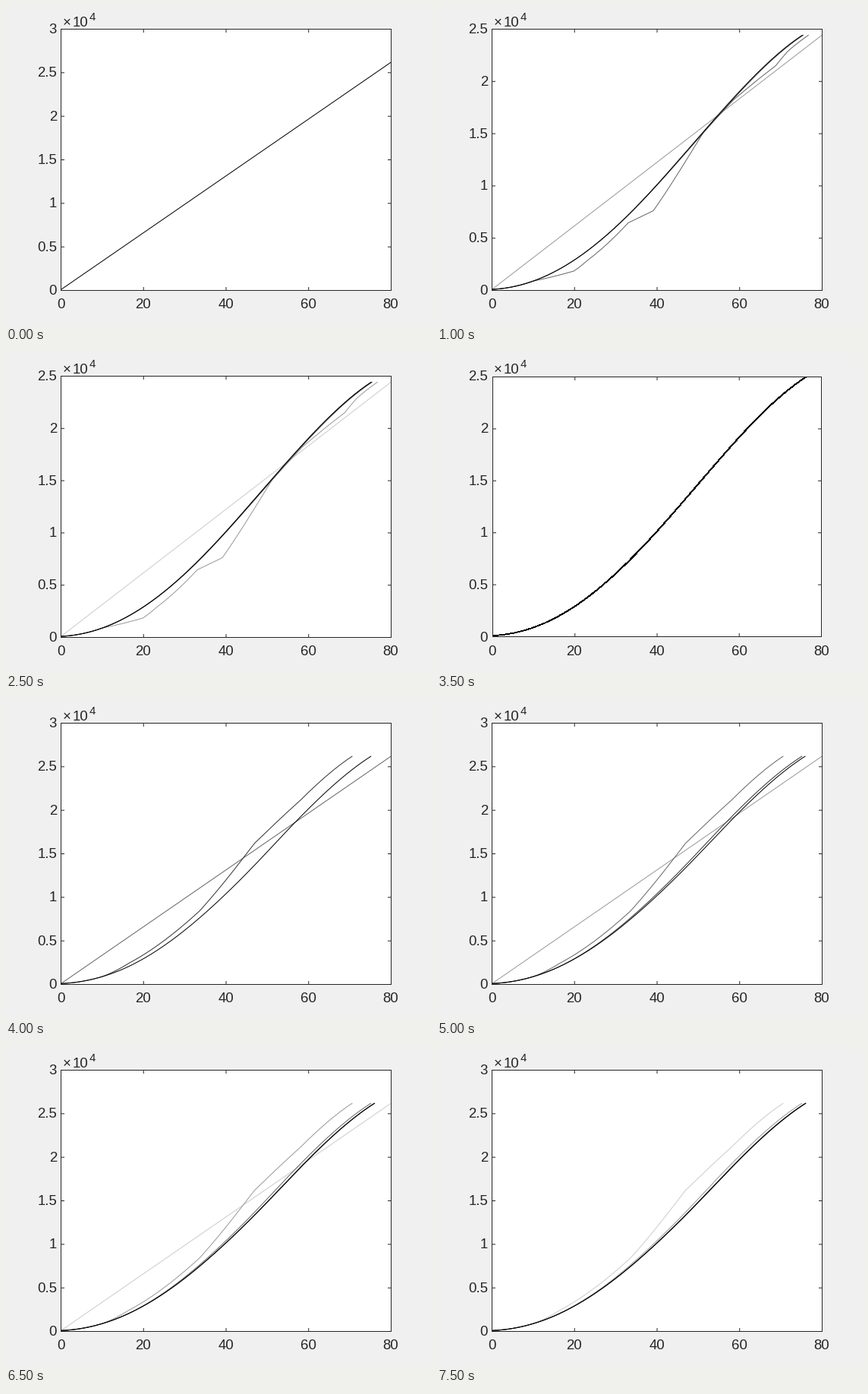
A matplotlib script for the animation above (8000 ms loop, 560 by 420 pixels).

```python
import numpy as np
import matplotlib.pyplot as plt
from matplotlib.animation import FuncAnimation

W, H, DPI = 560, 420, 100
PX = 72 / DPI
INK = "#262626"
FONT = "Liberation Sans"
SIZE = 18.67 * PX

# Order in which the three runs are shown, and the step each one starts at
ORDER = "ACBACBBCABACBACA"
START = {"A": 0, "B": 3, "C": 4}

# Plot box: left, top, right, bottom
WIDE = (72, 30, 507, 374)
TIGHT = (73, 31, 506, 373)

# top: axis limit, reach: end of the settled curve, lift: extra slope late on,
# detour: sideways error of the first correction as (x, shift)
RUNS = {
    "A": dict(top=30, reach=76.1, lift=.045, box=WIDE,
              detour=[(10, 0), (18, -1.6), (36, -2.4), (52.6, -5.9),
                      (63, -5), (76, -5.5)]),
    "B": dict(top=25, reach=75.2, lift=-.01, box=WIDE,
              detour=[(10, 0), (15.5, 4.4), (20, 3.3), (31, 2), (34, 5.1),
                      (51, .2), (58, .5), (66, 2.7), (70, 1.7), (76, 1.5)]),
    "C": dict(top=25, reach=76.3, lift=0, box=TIGHT,
              detour=[(10, 0), (17, 1.1), (32, .2), (47, -1.8), (62, 0),
                      (69, .6), (76, 0)]),
}

KEYS = np.array([(0, .1), (1, .9), (2, 2.93), (4, 10.15), (6, 19.2), (7.63, 25)])
BASE = np.polyfit(*KEYS.T, 5)


def settled(run, x):
    """Height (thousands) of the converged curve."""
    return np.polyval(BASE, x / 10) + run["lift"] * 3 * np.log1p(np.exp((x - 48) / 3))


def curve(run, i):
    """Trajectory after i corrections."""
    if i == 0:
        return np.array([0, 80]), np.array([.1, settled(run, run["reach"])])
    x = np.linspace(0, run["reach"], 200)
    at, shift = np.array(run["detour"]).T
    if i == 1:
        error = np.interp(x, at, shift)
    else:
        error = shift[-1] * .17 ** (i - 1) * np.clip((x - 15) / 40, 0, 1)
    return x + error, settled(run, x)


def to_px(box, top, x, y):
    left, up, right, low = box
    return (left + .5 + x * (right - left) / 80,
            low + .5 - y * (low - up) / top)


fig = plt.figure(figsize=(W / DPI, H / DPI), dpi=DPI, facecolor="#f0f0f0")
ax = fig.add_axes([0, 0, 1, 1])


def stroke(x, y, color=INK, width=1, **kw):
    ax.plot(x, y, color=color, lw=width * PX, snap=False, **kw)


def label(x, y, s, ha="left", size=SIZE):
    ax.text(x, y, s, ha=ha, va="baseline", size=size, color=INK, family=FONT)


def draw_axes(box, top):
    left, up, right, low = np.array(box) + .5
    for v in range(0, 81, 20):
        x, _ = to_px(box, top, v, 0)
        stroke([x, x], [low, low - 4], zorder=4)
        stroke([x, x], [up, up + 4], zorder=4)
        label(to_px(WIDE, top, v, 0)[0] - .5, 398, str(v), "center")
    for v in range(0, top + 1, 5):
        _, y = to_px(box, top, 0, v)
        stroke([left, left + 4], [y, y], zorder=4)
        stroke([right, right - 4], [y, y], zorder=4)
        label(67, to_px(WIDE, top, 0, v)[1] + 5.5, f"{v / 10:g}", "right")
    stroke([left, right, right, left, left], [up, up, low, low, up], zorder=4)
    label(74.5, 27, "×")
    label(88, 27, "10")
    label(110, 19, "4", size=SIZE * .8)


def draw(frame):
    name = ORDER[frame]
    step = START[name] + ORDER[:frame].count(name)
    run = RUNS[name]
    box, top = run["box"], run["top"]
    crisp = box is TIGHT

    ax.clear()
    ax.set(xlim=(0, W), ylim=(H, 0))
    ax.axis("off")
    left, up, right, low = np.array(box) + .5
    ax.fill([left, right, right, left], [up, up, low, low], color="white", lw=0)

    # Older curves fade to white in five steps
    for i in range(max(0, step - 4), step + 1):
        x, y = to_px(box, top, *curve(run, i))
        stroke(x, y, str(.2 * (step - i)), .8 if crisp else 1,
               antialiased=not crisp, solid_capstyle="butt", zorder=3)
    draw_axes(box, top)
    return []


anim = FuncAnimation(fig, draw, frames=len(ORDER), interval=500,
                     repeat=True, repeat_delay=0, blit=False)
plt.show()
```
